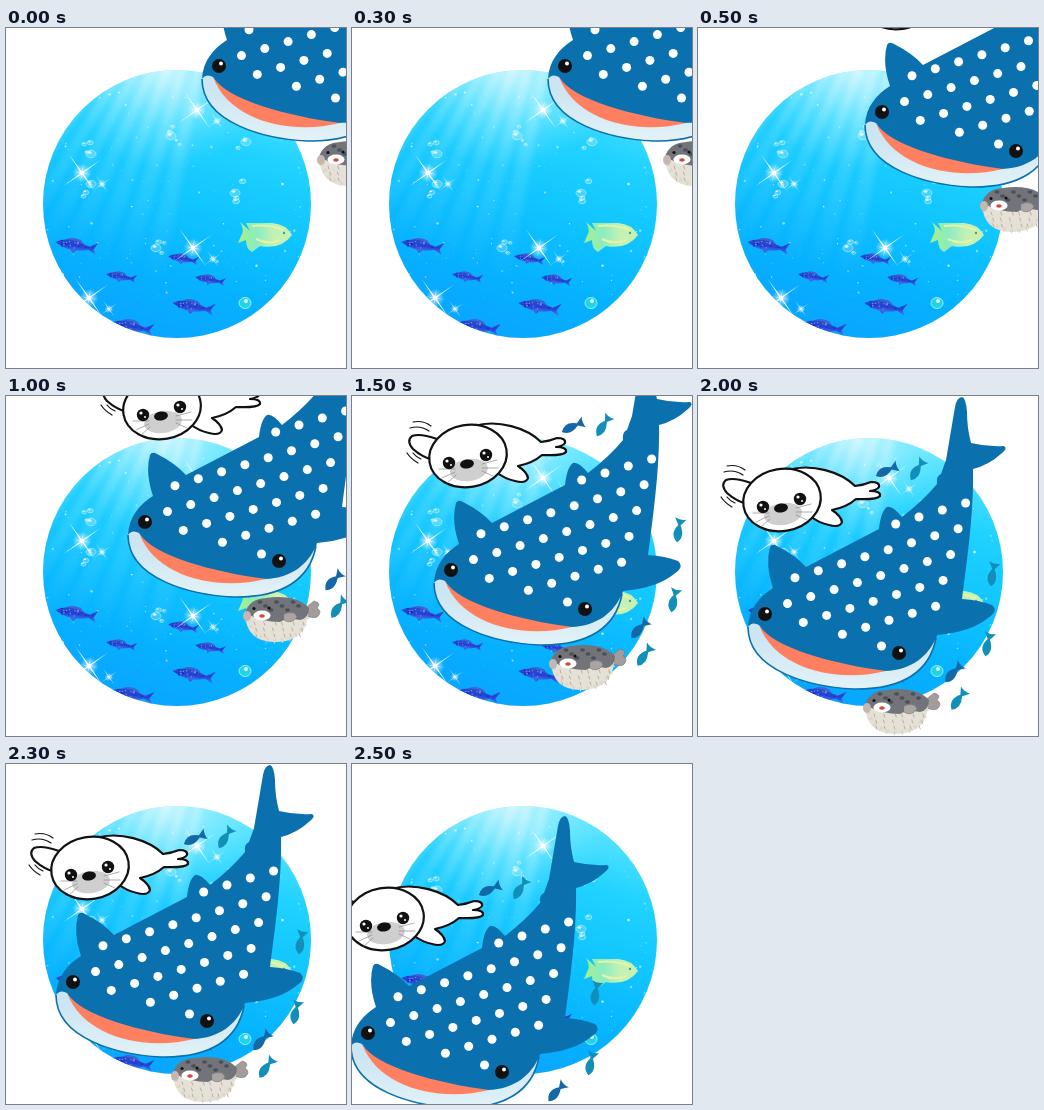
Animation, 340 px wide and 340 px high, one loop 3000 ms. Source, as an HTML page with a canvas:

```html
<!DOCTYPE html>
<html lang="en">
<head>
<meta charset="utf-8">
<style>
html, body { margin: 0; width: 100%; height: 100%; overflow: hidden; background: #fff; }
canvas { display: block; }
</style>
</head>
<body>
<canvas id="stage" width="340" height="340"></canvas>
<script>
const c = document.getElementById('stage').getContext('2d');
const STEP = 500;
// where the swimming group stands at each step
const STOPS = [[146, -180], [117, -134], [72, -92], [32, -44], [0, 0], [-51, 51]];
const BLUE = '#0b70ae', INK = '#111';

function shape(d, fill, stroke, width = 1) {
  const p = new Path2D(d);
  if (fill) { c.fillStyle = fill; c.fill(p); }
  if (stroke) { c.strokeStyle = stroke; c.lineWidth = width; c.stroke(p); }
}

function oval(x, y, rx, ry, fill, stroke, width = 1, turn = 0) {
  c.beginPath();
  c.ellipse(x, y, rx, ry, turn, 0, 7);
  if (fill) { c.fillStyle = fill; c.fill(); }
  if (stroke) { c.strokeStyle = stroke; c.lineWidth = width; c.stroke(); }
}
const dot = (x, y, r, fill) => oval(x, y, r, r, fill);

function at(x, y, degrees, scale, draw) {
  c.save();
  c.translate(x, y);
  c.rotate(degrees * Math.PI / 180);
  c.scale(scale, scale);
  draw();
  c.restore();
}

function seeded(seed) {
  return () => (seed = seed * 16807 % 2147483647) / 2147483647;
}

function gradient(g, ...stops) {
  stops.forEach((s, i) => g.addColorStop(i / (stops.length - 1), s));
  return g;
}

function sparkle(x, y, r) {
  dot(x, y, r * .4, gradient(c.createRadialGradient(x, y, 0, x, y, r * .4), '#ffffffc0', '#ffffff00'));
  for (let i = 0; i < 4; i++) {
    at(x, y, i * 45 + 10, i % 2 ? r : r * .45, () => shape('M-1 0L0-.03 1 0 0 .03Z', '#fff'));
  }
  dot(x, y, r * .1, '#fff');
}

function bubble(x, y, r) {
  oval(x, y, r, r * .75, '#ffffff30', '#d5f6ffc0', .7);
  oval(x - r * .3, y - r * .3, r * .4, r * .25, '#ffffffd0');
}

function reefFish(x, y, size) {
  at(x, y, 8, size / 41, () => {
    shape('M-11-4Q-6-9 4-6L8-2ZM-5 4L-2 7 2 3Z', '#3c62d8');
    shape('M-20-1Q-9-8 5-3L13-1 21-6 17 1 20 6 12 2Q-5 8-20-1Z',
      gradient(c.createLinearGradient(0, -7, 0, 7), '#2a55b8', '#2440d8', '#4a90f0'));
    const rnd = seeded(77);
    for (let i = 0; i < 24; i++) dot(-14 + rnd() * 24, -4 + rnd() * 6, .6, i % 2 ? '#7f9cf0' : '#2420a8');
  });
}

function yellowFish() {
  shape('M244 203L234 194Q239 202 235 208L232 215 240 212Q240 221 246 224L254 218Q275 222 286 207Q280 196 266 195L240 195Z',
    gradient(c.createLinearGradient(233, 0, 286, 0), '#a4f08c', '#8becc0', '#c4f2b4', '#c8f0b0'));
  shape('M246 198Q262 196 278 202M250 211Q262 217 274 212', null, '#e4f4a8', 2);
  dot(278, 205, 1.2, '#4c9c90');
}

function sea() {
  const rnd = seeded(2024);
  const near = (v, spread) => v + (rnd() - .5) * spread;
  c.save();
  c.beginPath();
  c.arc(171, 176, 134, 0, 7);
  c.clip();
  c.fillStyle = gradient(c.createLinearGradient(215, 42, 130, 310),
    '#62e6ff', '#1fd2ff', '#10c4ff', '#06b2ff', '#0aa4ff');
  c.fillRect(30, 40, 280, 275);
  c.fillStyle = gradient(c.createRadialGradient(160, 42, 0, 160, 42, 100), '#ffffffb0', '#c8faff58', '#a0f0ff00');
  c.fillRect(30, 40, 280, 275);

  // soft light falling to the lower left
  const ray = gradient(c.createLinearGradient(180, 40, 120, 250), '#ffffff58', '#c0f6ff28', '#c0f6ff00');
  c.filter = 'blur(3px)';
  for (let i = 0; i < 7; i++) {
    const top = 100 + i * 15, foot = -60 + i * 32;
    shape(`M${top} 35h7L${foot + 24} 260h-24Z`, ray);
  }
  c.filter = 'none';

  for (let i = 0; i < 190; i++) {
    const x = 40 + rnd() * 262, y = 55 + rnd() * 215;
    dot(x, y, .35 + rnd() ** 3 * 1.1, `rgba(225,252,255,${.3 + rnd() * .6})`);
  }

  for (const [x, y] of [[85, 126], [85, 156], [165, 108], [240, 114], [229, 165], [150, 220]]) {
    bubble(x, y, 5);
    for (let i = 0; i < 3; i++) bubble(near(x, 18), near(y, 26), 1.5 + rnd() * 2);
  }
  oval(239, 275, 6, 5.5, '#21d4e8', '#8cf4ec');
  dot(240, 273, 2, '#e9fffc');

  [[126, 299], [115, 249], [70, 218], [204, 252], [187, 279], [177, 231]]
    .forEach(([x, y], i) => reefFish(x, y, i % 2 ? 31 : 43));
  yellowFish();
  for (const [x, y] of [[76, 145], [191, 82], [187, 220], [83, 270]]) {
    sparkle(x, y, 23);
    sparkle(x + 20, y + 11, 10);
  }
  c.restore();
}

function shark() {
  shape('M50 231C51 213 61 201 75 192Q67 169 72 151Q74 147 79 150Q97 159 108 171L181 133Q183 115 189 111Q194 109 204 121Q226 104 239 88Q238 80 243 78L248 64L257 11Q259 1 264 1Q268 2 269 16Q269 32 273 47Q289 51 306 50Q310 52 304 57Q291 69 275 73C276 115 269 165 264 203Q281 204 294 209Q301 215 290 222Q273 236 239 239L237 246Q226 280 187 282L100 276Z', BLUE);
  const lip = 'M50 231C50 276 115 291 155 293C205 294 232 275 238 242';
  shape(lip + 'C230 260 214 274 187 275C125 274 81 263 61 229Q54 225 50 231Z',
    gradient(c.createLinearGradient(0, 240, 0, 293), '#cbe5f2', '#e3f2f7'));
  shape(lip, null, BLUE, 1.6);
  shape('M61 229C75 252 135 268 188 275C140 287 78 274 61 229Z', '#ff8060');

  // spots lie on a slanted grid, each row starting at its own column
  [4, 0, 0, 1, 3, 5].forEach((first, row) => {
    for (let i = first; i < (row < 5 ? 8 : 6); i++) {
      dot(104.5 + 23.3 * i - 7.5 * row, 156 - 7 * i + 25.8 * row, 4.5, '#fff');
    }
  });
  for (const [x, y] of [[67, 218], [201, 257]]) {
    dot(x, y, 7, INK);
    dot(x + 2, y - 2.5, 2, '#fff');
  }
}

function seal() {
  c.lineJoin = c.lineCap = 'round';
  shape('M90 74C114 67 143 76 157 90Q166 89 173 86Q182 86 181 91Q179 94 172 95Q183 95 182 100Q179 104 158 103Q149 111 134 114Q143 120 144 126Q142 132 131 129Q121 127 112 120Z', '#fff', INK, 2.2);
  shape('M53 87Q36 81 28 84Q22 89 29 97Q38 105 49 108', '#fff', INK, 2.2);
  oval(84, 104, 39, 31, '#fff', INK, 2.2, -.17);
  oval(85, 118, 19, 11, '#cfcfcf', null, 1, -.15);
  oval(83, 112, 7, 4.5, INK, null, 1, -.15);
  shape('M71 117L55 117M71 120L58 126M72 123L63 131M98 112L113 108M98 116L114 116M98 119L109 124', null, '#888', .7);
  for (const [x, y] of [[65, 111], [102, 103]]) {
    dot(x, y, 6.2, INK);
    dot(x - 2, y - 2, 1.6, '#fff');
    dot(x + 2, y + 2, 1, '#fff');
  }
  shape('M26 76Q36 73 45 79M29 70Q39 68 47 74M23 101Q27 107 34 111M29 101Q32 105 37 107', null, INK, 1.2);
}

function puffer() {
  const rnd = seeded(9);
  shape('M226 305L236 297Q244 299 239 304Q245 308 239 313Q235 315 226 311Z', '#a39c9b', '#777', .6);
  shape('M167 309Q168 339 199 338Q229 337 230 309Z', '#e6e1d6');
  for (let a = .15; a < 3; a += .25) {
    at(199 + 30 * Math.cos(a), 310 + 27 * Math.sin(a), a * 57.3, 1, () => shape('M-2-2L3 0-2 2Z', '#ddd7ca'));
  }
  for (let i = 0; i < 18; i++) {
    shape(`M${176 + i % 6 * 9 + rnd() * 4} ${318 + Math.floor(i / 6) * 6}l1 3`, null, '#aaa397', .8);
  }
  shape('M167 309Q171 295 188 294Q218 290 231 304Q231 314 222 316Q209 313 202 318Q184 318 167 309Z', '#72747a');
  for (let i = 0; i < 8; i++) oval(182 + i * 5.5, 298 + i % 3 * 4, 2.5, 1.8, '#4b4f57');
  shape('M206 310Q217 306 219 313Q213 321 206 316Z', '#aaa5a3', '#77777a', .6);
  oval(169, 312, 4, 5, '#c5b6b0');
  oval(184, 311.5, 8.5, 5, '#fff');
  oval(184, 312, 2.8, 1.7, '#d9443c');
  dot(176, 304.5, 1.6, INK);
  dot(191, 304, 1.6, INK);
}

function escorts() {
  [[187, 75, -22], [218, 75, -55], [294, 180, -78], [289, 250, -75], [254, 278, -45], [259, 305, -52]]
    .forEach(([x, y, turn], i) => at(x, y, turn, 1.15, () =>
      shape('M-9 1Q-3-7 6-1L12-5Q10 0 12 5L6 1Q-3 7-9 1Z', i % 4 ? '#118fb9' : '#1468a6')));
}

let shown;
function frame() {
  const step = Math.floor(performance.now() / STEP) % STOPS.length;
  if (step !== shown) {
    shown = step;
    c.clearRect(0, 0, 340, 340);
    sea();
    at(...STOPS[step], 0, 1, () => {
      escorts();
      shark();
      seal();
      puffer();
    });
  }
  requestAnimationFrame(frame);
}
frame();
</script>
</body>
</html>
```
